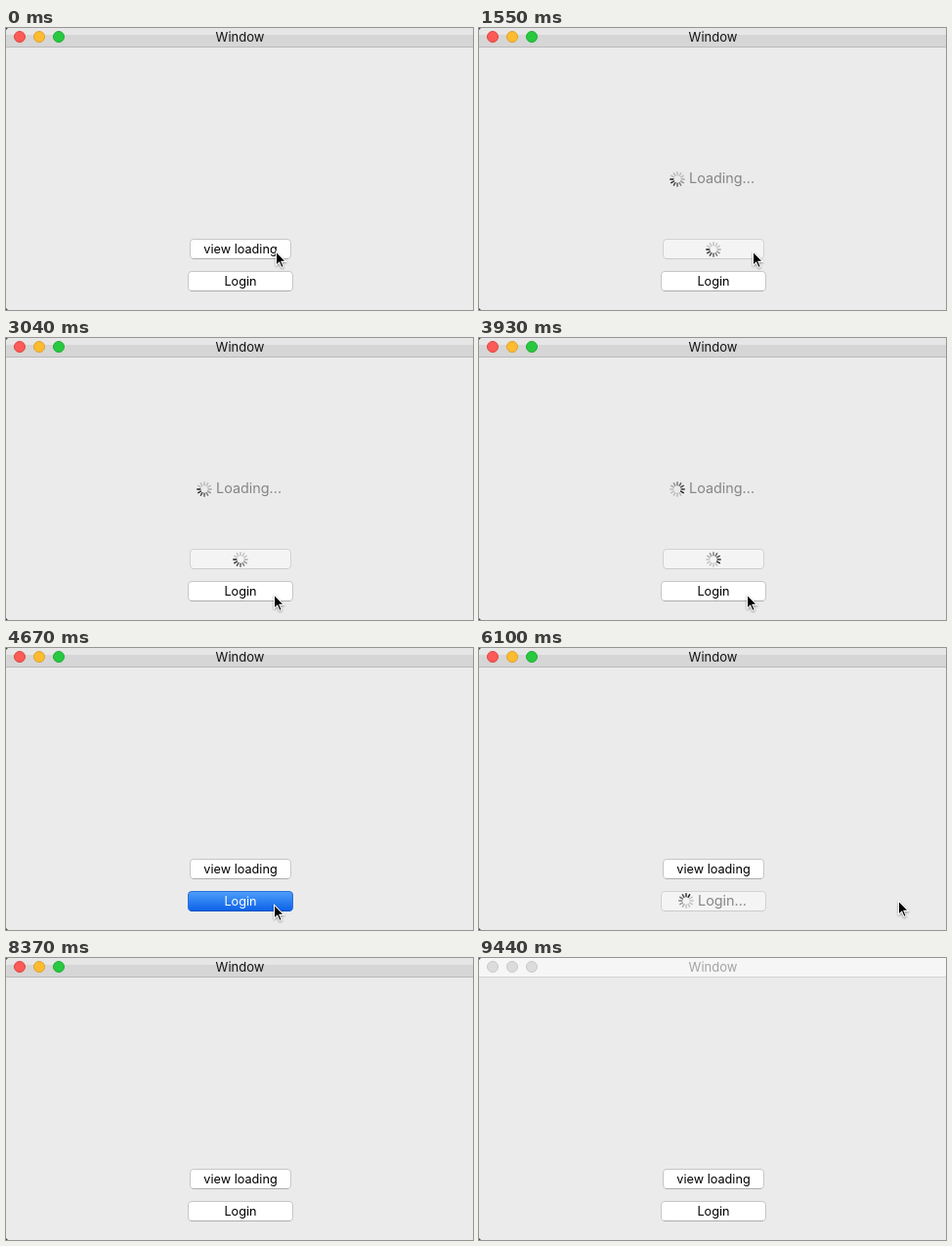
Write an HTML page that moves like this. It is 478x289 px and loops after 9540 ms.

```html
<!DOCTYPE html>
<html lang="en">
<head>
<meta charset="utf-8">
<title>Window</title>
<style>
  html, body { margin: 0; width: 100%; height: 100%; overflow: hidden; background: #ebebeb; }
  svg { display: block; width: 100%; height: 100%; font: 12.7px Inter, "Open Sans", sans-serif; }
  .mid { text-anchor: middle; }
  .title { font-size: 13px; fill: #151515; }
  .big { font-size: 14.4px; fill: #858585; }
  .spokes line { stroke: #000; stroke-width: 1.5; stroke-linecap: round; }
  #cursor { filter: drop-shadow(0 1px 1px rgba(0, 0, 0, .4)); }

  .inactive .lights circle { fill: #dcdcdc; stroke: #c9c9c9; }
  .inactive .bar { fill: #f6f6f6; }
  .inactive .edge { fill: #d3d3d3; }
  .inactive .title { fill: #a3a3a3; }

  .button .face { fill: #fff; stroke: #c6c6c6; }
  .button .lip { stroke: #adadad; }
  .busy { display: none; }
  .pressed .face { fill: url(#blue); stroke: #2a6fd8; }
  .pressed .lip { stroke: #0d50c0; }
  .pressed .label { fill: #fff; }
  .loading .face { fill: #f4f4f4; stroke: #d2d2d2; }
  .loading .lip { stroke: #cbcbcb; }
  .loading .label { display: none; }
  .loading .busy { display: inline; }
</style>
</head>
<body>
<svg id="stage" viewBox="0 0 478 289">
  <defs>
    <linearGradient id="blue" x2="0" y2="1">
      <stop stop-color="#4f9ffa"/><stop offset="1" stop-color="#0b61e8"/>
    </linearGradient>
  </defs>
  <rect width="478" height="289" fill="#ebebeb"/>

  <rect class="bar" width="478" height="7" fill="#e6e6e6"/>
  <rect class="bar" y="7" width="478" height="12" fill="#d6d6d6"/>
  <rect class="edge" y="19" width="478" height="1" fill="#b9b9b9"/>
  <g class="lights">
    <circle cx="14" cy="9" r="5.5" fill="#fc5b57" stroke="#e0443f"/>
    <circle cx="34" cy="9" r="5.5" fill="#fdbc2f" stroke="#dfa02f"/>
    <circle cx="54" cy="9" r="5.5" fill="#28c940" stroke="#1fab33"/>
  </g>
  <text class="title mid" x="239.5" y="14">Window</text>
  <path d="M0 0h2L0 2zM0 289h2l-2-2z" fill="#444"/>

  <g class="button" id="view">
    <g class="busy">
      <g class="spokes" transform="translate(203 155)"></g>
      <text class="big" x="215" y="159">Loading...</text>
    </g>
    <rect class="face" x="188.5" y="216.5" width="103" height="20" rx="3.5"/>
    <path class="lip" d="M191 236.5h98"/>
    <text class="label mid" x="240" y="231">view loading</text>
    <g class="busy"><g class="spokes" transform="translate(240 227)"></g></g>
  </g>

  <g class="button" id="login">
    <rect class="face" x="186.5" y="249.5" width="107" height="20" rx="3.5"/>
    <path class="lip" d="M189 269.5h102"/>
    <text class="label mid" x="240" y="264">Login</text>
    <g class="busy">
      <g class="spokes" transform="translate(212 259)"></g>
      <text class="big" x="224" y="264">Login...</text>
    </g>
  </g>

  <g id="cursor">
    <path d="M0 0v16.2l3.6-3.2 2.2 5.1 2.9-1.2-2.2-5h5.2z" fill="#fff"/>
    <path d="M1 2.4v11.5l2.9-2.6 2.4 5.4 1.2-.5-2.4-5.4h4z"/>
  </g>
</svg>

<script>
const LOOP = 9540, INACTIVE_FROM = 9440;
const SPOKES = 12, SPOKES_PER_TICK = 1.2;

// The screen refreshes in ticks, a little faster once the login is pressed
const PIVOT = 4670, SLOW_TICK = 149, FAST_TICK = 141;
const tickLength = time => time < PIVOT ? SLOW_TICK : FAST_TICK;
const tickAt = time => Math.floor((time - PIVOT) / tickLength(time));

const buttons = [
  { id: 'view', press: 750, load: 960, done: 4380, firstLead: 4.3 },
  { id: 'login', press: 4670, load: 4820, done: 8080, firstLead: 2.3 }
];

const stage = document.getElementById('stage');
const cursor = document.getElementById('cursor');

const smooth = k => k * k * (3 - 2 * k);
const settle = k => 1 - (1 - k) ** 4;
const progress = (time, from, to) => Math.min(1, Math.max(0, (time - from) / (to - from)));

function pointerAt(time) {
  const nudge = smooth(progress(time, 960, 1500));
  const swing = smooth(progress(time, 1850, 3020));
  const away = settle(progress(time, 5720, 6400));
  const leave = progress(time, 7960, 8330);
  return [
    276 + 4 * nudge - 6 * swing + 30 * Math.sin(Math.PI * swing) + 163 * away + 18 * leave,
    228 + 34 * swing - 4 * away + 42 * leave
  ];
}

// The leading spoke is darkest; the ones behind it fade
function turnSpinner(spinner, lead) {
  [...spinner.children].forEach((spoke, i) => {
    const behind = (lead - i + SPOKES) % SPOKES;
    spoke.style.opacity = Math.max(0.2, 0.88 - behind * 0.1);
  });
}

function drawButton({ id, press, load, done, firstLead }, time) {
  const button = document.getElementById(id);
  const loading = time >= load && time < done;
  button.classList.toggle('pressed', time >= press && time < load);
  button.classList.toggle('loading', loading);
  if (!loading) return;
  const turned = (tickAt(time) - tickAt(load)) * SPOKES_PER_TICK;
  const lead = Math.floor(firstLead + turned) % SPOKES;
  button.querySelectorAll('.spokes').forEach(spinner => turnSpinner(spinner, lead));
}

function draw(time) {
  buttons.forEach(button => drawButton(button, time));
  const tickTime = PIVOT + tickAt(time) * tickLength(time);
  cursor.setAttribute('transform', `translate(${pointerAt(tickTime).map(Math.round)})`);
  stage.classList.toggle('inactive', time >= INACTIVE_FROM);
}

document.querySelectorAll('.spokes').forEach(spinner => {
  spinner.innerHTML = Array.from({ length: SPOKES }, (_, i) =>
    `<line y1="-4.2" y2="-7.2" transform="rotate(${i * 360 / SPOKES})"/>`).join('');
});

const start = performance.now();
function frame() {
  draw((performance.now() - start) % LOOP);
  requestAnimationFrame(frame);
}
frame();
</script>
</body>
</html>
```
